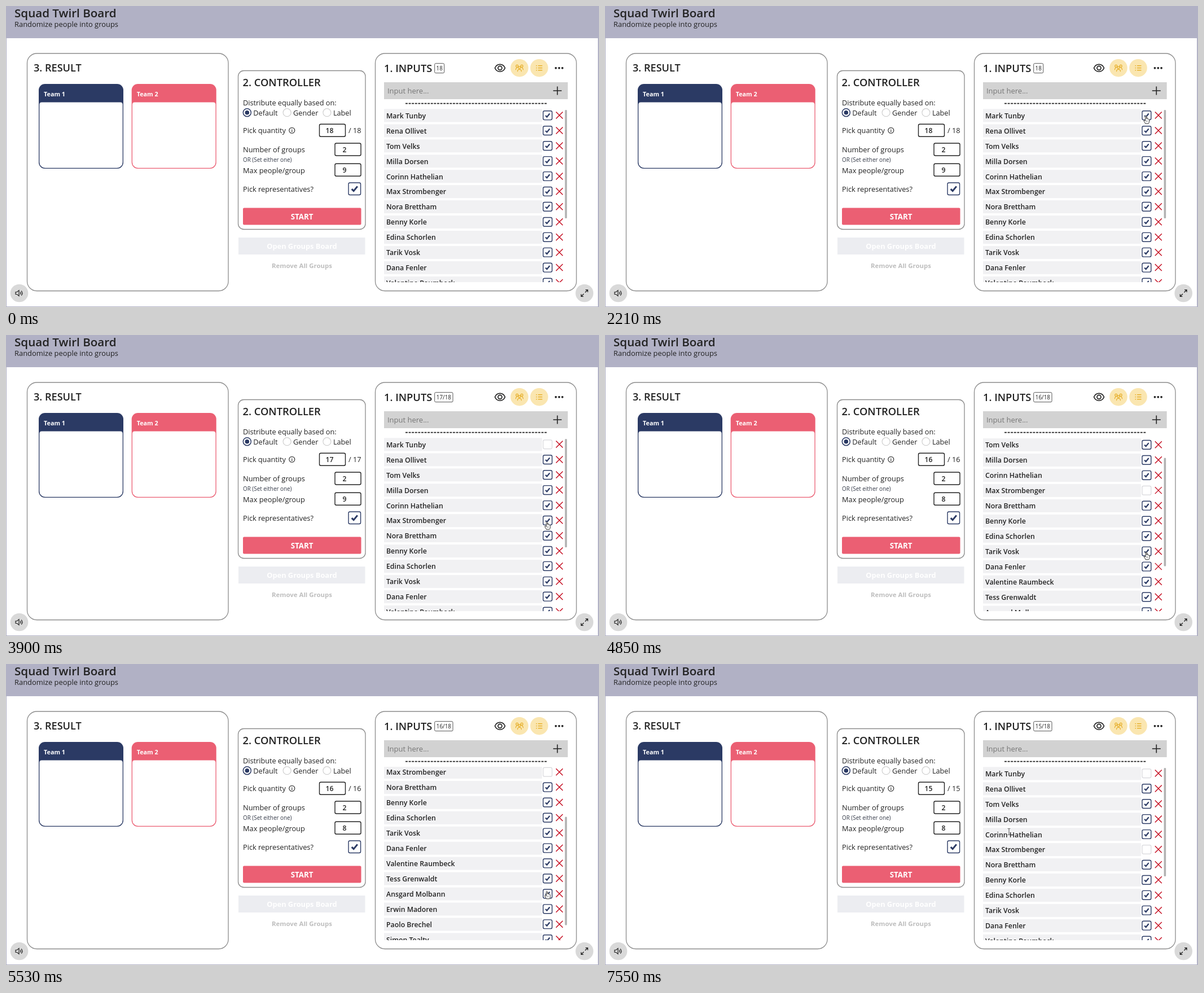
An HTML page with a canvas for the animation above (8 s loop, 1051 px wide and 533 px high).

```html
<!DOCTYPE html>
<html lang="en">
<head>
<meta charset="utf-8">
<title>Group picker</title>
<style>
html, body { margin: 0; width: 100%; height: 100%; overflow: hidden; background: #fff; }
canvas { display: block; width: 1051px; height: 533px; }
</style>
</head>
<body>
<canvas id="stage" width="1051" height="533"></canvas>
<script>
const ctx = document.getElementById('stage').getContext('2d');
const LOOP = 8000, PITCH = 26.95, SCROLL = 137.2;
const NAVY = '#2b3a64', PINK = '#eb5f73', LILAC = '#b1b1c5', INK = '#222', GOLD = '#e5ac24';
const FONT = '"Open Sans", "Noto Sans", sans-serif';
const names = ['Mark Tunby', 'Rena Ollivet', 'Tom Velks', 'Milla Dorsen', 'Corinn Hathelian',
  'Max Strombenger', 'Nora Brettham', 'Benny Korle', 'Edina Schorlen', 'Tarik Vosk', 'Dana Fenler',
  'Valentine Raumbeck', 'Tess Grenwaldt', 'Ansgard Molbann', 'Erwin Madoren', 'Paolo Brechel',
  'Simon Tealty', 'Irma Colbert'];

// row index -> time it gets unticked
const clicks = { 0: 2940, 5: 4030, 13: 6130 };

// pointer moves: start, end, number of steps, path
const moves = [
  [1120, 1600, 7, [[1045, 533], [1040, 460], [1034, 300], [1032, 201]]],
  [1870, 2210, 6, [[1032, 201], [985, 197], [958.5, 194.5]]],
  [3210, 3900, 11, [[958.5, 194.5], [958.5, 275], [958.5, 349], [958.5, 330.5]]],
  [4360, 4580, 4, [[958.5, 330.5], [959, 384]]],
  [5250, 5530, 5, [[959, 384], [958.5, 402]]],
  [6600, 6670, 2, [[958.5, 402], [880, 328.5]]],
  [7340, 7550, 4, [[880, 328.5], [840, 353], [765, 330], [716, 297]]]
];

// fraction done of a move that advances in n visible steps
function progress(t, t0, t1, n) {
  if (t < t0) return 0;
  return Math.min(n, 1 + Math.floor((t - t0) * (n - 1) / (t1 - t0) + 1e-6)) / n;
}

function along(path, p) {
  const f = p * (path.length - 1), i = Math.min(path.length - 2, Math.floor(f)), u = f - i;
  return path[i].map((v, k) => v + (path[i + 1][k] - v) * u);
}

function pointerAt(t) {
  const move = moves.filter(m => t >= m[0]).pop();
  return move && along(move[3], progress(t, move[0], move[1], move[2]));
}

function scrollAt(t) {
  if (t >= 6940) return SCROLL * (1 - progress(t, 6940, 7140, 3)) ** 1.5;
  return SCROLL * (1 - (1 - progress(t, 4850, 5110, 5)) ** 2.2);
}

function text(str, x, y, size, weight = 400, color = INK, align = 'left') {
  ctx.font = `${weight} ${size}px ${FONT}`;
  ctx.fillStyle = color;
  ctx.textAlign = align;
  ctx.fillText(str, x, y);
}

function rect(x, y, w, h, color) {
  ctx.fillStyle = color;
  ctx.fillRect(x, y, w, h);
}

function box(x, y, w, h, r, fill, stroke, width = 1.4) {
  ctx.beginPath();
  ctx.roundRect(x, y, w, h, r);
  paint(fill, stroke, width);
}

function disc(x, y, r, fill, stroke, width = 1.4) {
  ctx.beginPath();
  ctx.arc(x, y, r, 0, 7);
  paint(fill, stroke, width);
}

function paint(fill, stroke, width) {
  if (fill) { ctx.fillStyle = fill; ctx.fill(); }
  if (stroke) { ctx.strokeStyle = stroke; ctx.lineWidth = width; ctx.stroke(); }
}

// SVG path drawn relative to x, y
function shape(d, x, y, fill, stroke, width = 1.4, scale = 1) {
  ctx.save();
  ctx.translate(x, y);
  ctx.scale(scale, scale);
  const p = new Path2D(d);
  if (fill) { ctx.fillStyle = fill; ctx.fill(p); }
  if (stroke) {
    ctx.strokeStyle = stroke;
    ctx.lineWidth = width;
    ctx.stroke(p);
  }
  ctx.restore();
}

function tickBox(x, y, size, on) {
  const h = size / 2;
  box(x - h, y - h, size, size, 2.5, '#fff', on ? NAVY : '#d8d8dc', on ? 1.4 : 1.2);
  if (on) shape('M-4 .3L-1.3 3L4-3.5', x, y, null, NAVY, 2.4, size / 17);
}

function panel(x, y, w, h, r) {
  box(x, y, w, h, r, '#fff', '#8c8c8c', 1.3);
}

function page() {
  rect(0, 0, 1051, 533, LILAC);
  rect(1, 57, 1048, 475, '#fff');
  text('Squad Twirl Board', 15, 19.5, 20.6, 600);
  text('Randomize people into groups', 15, 36.5, 12.9);
  panel(37.5, 84, 356.5, 420.5, 17);
  panel(411.5, 114.5, 225.5, 281, 10);
  panel(654.5, 84, 356.5, 420.5, 17);
}

function team(x, label, color) {
  box(x, 138, 150, 150, 11, color);
  box(x + 1.3, 170.5, 147.4, 116.2, [4, 4, 10, 10], '#fff');
  text(label, x + 9, 160, 10.8, 700, '#fff');
}

function numberBox(x, y, value) {
  box(x, y, 46, 22, 2.5, '#fff', INK, 1.4);
  text(value, x + (value > 9 ? 11 : 13.5), y + 16, 12.2, 600);
}

function controller(count) {
  text('2. CONTROLLER', 419.5, 142, 18.3, 600);
  text('Distribute equally based on:', 420, 175.5, 12.7);
  ['Default', 'Gender', 'Label'].forEach((label, i) => {
    const x = 427.3 + i * 70.8;
    disc(x, 188.7, 7, '#fff', i ? '#d0d0d0' : NAVY, i ? 1.2 : 1.5);
    if (!i) disc(x, 188.7, 3.8, NAVY);
    text(label, x + 11, 193.5, 12.7);
  });
  text('Pick quantity', 420, 225, 12.7);
  disc(506.8, 220.3, 5, null, INK, 1.1);
  rect(506.2, 219.6, 1.2, 3.6, INK);
  rect(506.2, 217.3, 1.2, 1.2, INK);
  numberBox(555.5, 209.2, count);
  text('/ ' + count, 629.5, 225, 12.7, 400, INK, 'right');
  text('Number of groups', 420, 259, 12.8);
  numberBox(583, 243, 2);
  text('OR (Set either one)', 420, 276.3, 9.9, 400, '#343a48');
  text('Max people/group', 420, 295.5, 12.8);
  numberBox(583, 279.3, Math.ceil(count / 2));
  text('Pick representatives?', 420, 329, 12.8);
  tickBox(617.8, 323.8, 21.5, true);
  box(420, 357.5, 209.5, 30, 2, PINK);
  text('START', 524.5, 377.8, 13.3, 700, '#fff', 'center');
  rect(412, 410, 224.5, 30, '#ecedf1');
  text('Open Groups Board', 524.5, 430.3, 12.8, 700, '#fff', 'center');
  text('Remove All Groups', 524.5, 463.7, 11.4, 700, '#bebebe', 'center');
}

function inputs(count) {
  const full = count === names.length;
  text('1. INPUTS', 670, 117.3, 18.3, 600);
  box(759.7, 101.7, full ? 17 : 32.3, 17, 2, '#fff', '#555', 1);
  text(full ? count : count + '/' + names.length, full ? 768.2 : 775.9, 114.2, 9.9, 400, INK, 'center');

  shape('M-9 0C-5.5-8.6 5.5-8.6 9 0C5.5 8.6-5.5 8.6-9 0Z', 875.5, 109.8, null, INK, 1.7);
  disc(875.5, 109.8, 3.5, null, INK, 1.7);
  disc(910, 109.7, 15.8, '#fae6b0');
  disc(945, 109.7, 15.8, '#fae6b0');
  for (const [dx, dy] of [[-4.2, -3.3], [4.2, -3.3], [0, -.6]]) {
    disc(910 + dx, 109.7 + dy, 2, '#fae6b0', GOLD, 1.1);
  }
  shape('M-3.4 6.5V5Q-3 2.5 0 2.5Q3 2.5 3.4 5V6.5M-6.5 3.5V2Q-6.2 0-4 0M6.5 3.5V2Q6.2 0 4 0', 910, 109.7, null, GOLD, 1.1);
  for (const dy of [-4, 0, 4]) {
    rect(939.5, 109 + dy, 1.6, 1.4, GOLD);
    rect(943, 109 + dy, 7.5, 1.4, GOLD);
  }
  for (const x of [974.5, 980.3, 986.1]) disc(x, 109.8, 1.9, INK);

  rect(670, 135, 325.7, 30, '#d2d2d2');
  text('Input here...', 676, 155, 13, 400, '#757575');
  shape('M-7.5 0H7.5M0-7.5V7.5', 977.3, 150, null, INK, 1.6);
  ctx.setLineDash([3.9, 1.7]);
  shape('M0 0H251', 708, 172.7, null, INK, 1.7);
  ctx.setLineDash([]);
}

function list(t, scroll) {
  ctx.save();
  ctx.beginPath();
  ctx.rect(668, 182, 328, 307);
  ctx.clip();
  names.forEach((name, i) => {
    const y = 193.9 + i * PITCH - scroll;
    if (y < 165 || y > 505) return;
    rect(670, y - 11.5, 280, 23, '#f1f1f3');
    text(name, 674, y + 4.8, 12.3, 600);
    tickBox(959.9, y - .2, 15.8, !(t >= clicks[i]));
    shape('M-6-6L6 6M6-6L-6 6', 980.8, y - .3, null, '#c4091d', 1.4);
  });
  box(990.6, 184 + scroll * .63, 3.6, 192, 1.5, '#b2b2b2');
  ctx.restore();
}

function cornerButtons() {
  disc(23.5, 508.5, 15.8, '#d9d9d9');
  shape('M-6.5-2H-4L-.5-5V5L-4 2H-6.5Z', 23.5, 508.5, null, INK, 1.2);
  shape('M1.8-2.2Q3.6 0 1.8 2.2M3.6-4.2Q7.2 0 3.6 4.2', 23.5, 508.5, null, INK, 1.2);
  disc(1025.2, 508.5, 15.8, '#d9d9d9');
  shape('M1.2-1.2L5.7-5.7M1.8-5.8H5.8V-1.8M-1.2 1.2L-5.7 5.7M-1.8 5.8H-5.8V1.8', 1025.2, 508.5, null, INK, 1.3);
}

function pointer(x, y, scroll) {
  const off = (y + scroll - 193.9 + PITCH / 2) % PITCH - PITCH / 2;
  const inList = y > 182 && y < 489;
  if (inList && x > 952 && x < 988 && Math.abs(off) < 8.5) {
    shape('M-1 1Q0-.7 1 1V5.4Q2 0 3 5.6Q4 4.7 4.7 6Q6 5.6 6 7.2V10.5Q5.8 12.5 4.6 13.8H-.8Q-1.8 11.2-4 8.6Q-3.3 6.9-1 9Z',
      x, y, '#fff', '#333', 1);
    shape('M1 7.8V11.2M2.7 7.8V11.2', x, y, null, '#666', .6);
  } else if (inList && x > 670 && x < 950) {
    shape('M-2.2-5.5H-.6L0-5L.6-5.5H2.2M0-5V5M-2.2 5.5H-.6L0 5L.6 5.5H2.2', x, y, null, '#555', 1);
  } else {
    shape('M0 0V10.8L2.5 8.5L4.1 12L5.6 11.3L4.1 7.9H7.5Z', x, y, '#fff', '#333', .9);
  }
}

function draw(t) {
  const scroll = scrollAt(t), at = pointerAt(t);
  const count = names.length - Object.values(clicks).filter(c => t >= c).length;
  page();
  text('3. RESULT', 49, 115.7, 18.1, 600);
  team(58, 'Team 1', NAVY);
  team(222.7, 'Team 2', PINK);
  controller(count);
  inputs(count);
  list(t, scroll);
  cornerButtons();
  if (at) pointer(at[0], at[1], scroll);
}

const begin = performance.now();
function tick() {
  draw((performance.now() - begin) % LOOP);
  requestAnimationFrame(tick);
}
tick();
</script>
</body>
</html>
```
